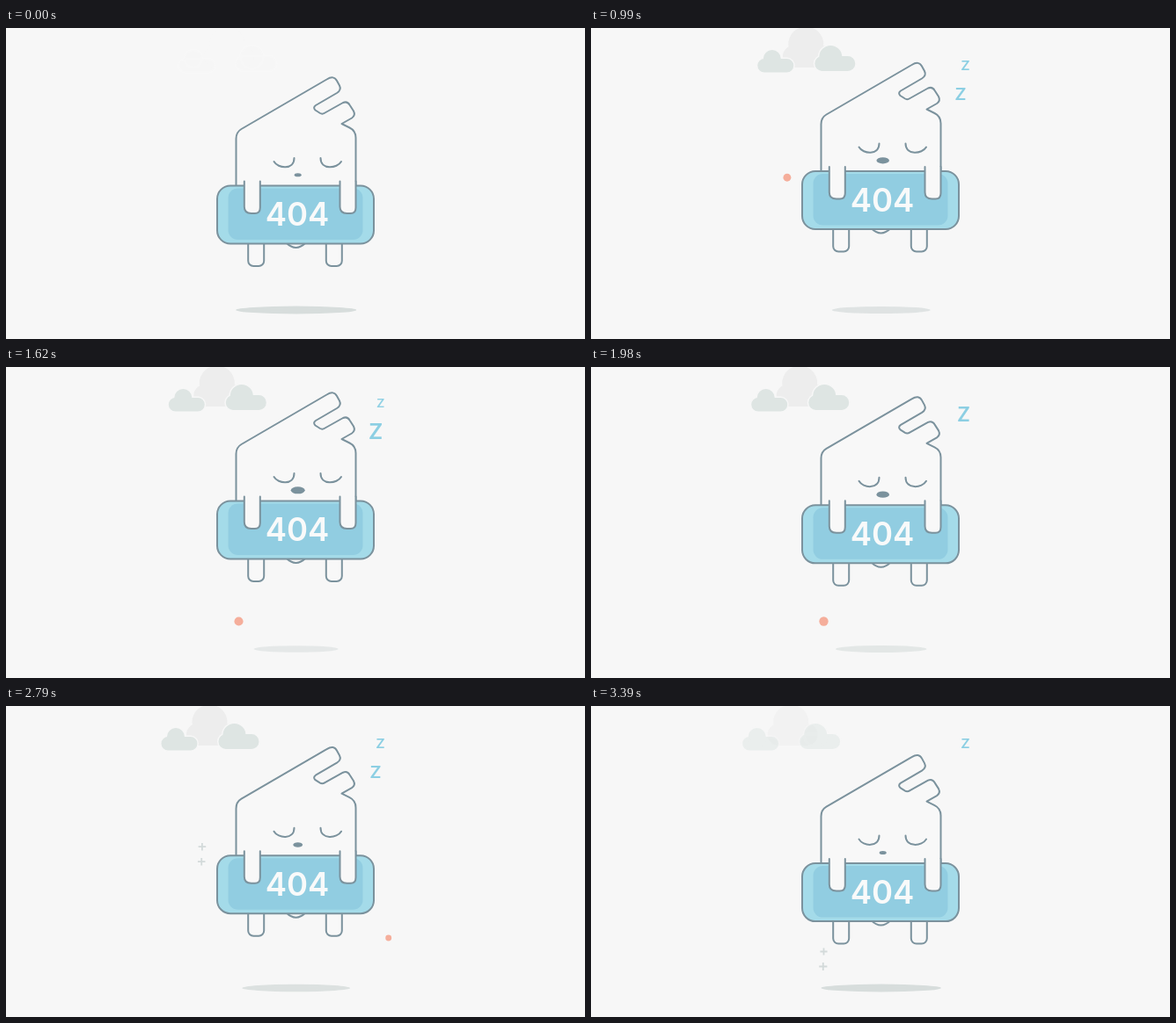
Recreate the animation shown at these times as an HTML page with a canvas. Size 658x354 px, loop 3.42 s.

```html
<!DOCTYPE html>
<html lang="en">
<head>
<meta charset="utf-8">
<title>404</title>
<style>
html, body { margin: 0; width: 100%; height: 100%; overflow: hidden; background: #f7f7f7; }
canvas { display: block; }
</style>
</head>
<body>
<canvas id="stage" width="658" height="354"></canvas>
<script>
const ctx = document.getElementById('stage').getContext('2d');
const LOOP = 3420, STEP = 30, PEAK = 1650, LIFT = 27.5;
const BG = '#f7f7f7', SKIN = '#f8f8f8', LINE = '#7b929d', BLUE = '#8ccfe3';

const clamp = v => Math.max(0, Math.min(1, v));

// Pops up quickly, holds, then shrinks away while u runs from 0 to 1.
const pulse = (u, pop, hold) => u > 0 && u < 1 ? Math.min(1, u * pop) * (1 - u ** hold) : 0;

function ellipse(x, y, rx, ry, fill) {
  ctx.beginPath();
  ctx.ellipse(x, y, rx, ry, 0, 0, 7);
  ctx.fillStyle = fill;
  ctx.fill();
}

function shape(path, fill, stroke, x = 0) {
  ctx.save();
  ctx.translate(x, 0);
  if (fill) { ctx.fillStyle = fill; ctx.fill(path); }
  if (stroke) { ctx.strokeStyle = stroke; ctx.stroke(path); }
  ctx.restore();
}

function box(x, y, w, h, r) {
  const p = new Path2D();
  p.roundRect(x, y, w, h, r);
  return p;
}

// A rounded base with one bump.
function cloud(x, y, w, h, bumpX, bumpY, r) {
  const p = box(x, y, w, h, h / 2);
  p.moveTo(bumpX + r, bumpY);
  p.arc(bumpX, bumpY, r, 0, 7);
  return p;
}

const bigCloud = cloud(221, 20, 57, 25, 247.5, 18.5, 20);
const leftCloud = cloud(192.5, 35, 41, 15.5, 209, 35, 10);
const rightCloud = cloud(257.5, 32, 46, 17, 275.5, 33, 13);

const body = new Path2D(`M261.5 200V126Q261.5 118.500 267.5 115L364.5 58.500Q372.5 53.500 376 60
  L379 65.500Q381.5 70.500 376 74L352 88Q348.5 90.500 351.5 93.500L357 97Q359.5 98.500 362.5 96.500
  L383 85Q388 83 390.5 87.500L395 94.500Q397.5 99.500 393 102.500L381.5 109
  L390.5 113.500Q397.5 117 397.5 125V200`);
const leg = box(-9, 236, 18, 35, [0, 0, 6, 6]);
const arm = new Path2D('M-9 174.500V203.500Q-9 211 -1 211H3Q9 211 9 204.500V174.500');
const belly = new Path2D('M318.500 244.500Q329.500 255.500 340.500 244.500');
const eyes = new Path2D('M304.500 152C309 160 327.500 162 327.500 148M357.500 148C357.500 162 376.500 160 381 152');
const board = box(240, 179.5, 178, 66, 15);
const panel = box(252.5, 182.5, 153, 58.5, 11);

function drawClouds(t) {
  ctx.save();
  ctx.translate(3.85 - t * .00713, 0);
  ctx.globalAlpha = Math.min(clamp(.08 + t / 290), clamp(.25 + (LOOP - t) / 120));
  ctx.lineWidth = 3;
  shape(bigCloud, '#ededed');
  for (const c of [leftCloud, rightCloud]) {
    shape(c, null, BG);
    shape(c, '#dee5e3');
  }
  ctx.restore();
}

function drawCharacter(t) {
  const rising = t < PEAK;
  const phase = rising ? t / PEAK : (LOOP - t) / (LOOP - PEAK);
  const lift = LIFT * (rising ? phase : phase ** 1.05);
  const nose = 4 + 4 * (rising ? Math.sin(phase * Math.PI / 2) : phase);

  ctx.globalAlpha = 1 - lift * .017;
  ellipse(329.7, 321, 68.5 - lift * .757, 4.4 - lift * .02, '#d7dddc');
  ctx.globalAlpha = 1;

  ctx.save();
  ctx.translate(0, -lift);
  ctx.lineWidth = 2;
  ctx.lineJoin = ctx.lineCap = 'round';
  for (const x of [284.2, 372.8]) shape(leg, SKIN, LINE, x);
  shape(belly, SKIN, LINE);
  shape(body, SKIN, LINE);
  shape(eyes, null, LINE);
  ellipse(331.7, 167.3, nose, nose / 2, LINE);

  shape(board, '#a4dbe9', LINE);
  shape(panel, '#91cde1');
  for (const x of [279.8, 388.5]) shape(arm, SKIN, LINE, x);
  ctx.fillStyle = '#f9fafa';
  ctx.font = '600 36.5px Inter, sans-serif';
  ctx.fillText('404', 331, 225);
  ctx.restore();
}

function drawSnores(t) {
  ctx.fillStyle = BLUE;
  for (let i = 0; i < 5; i++) {
    const age = t - 300 - i * 600, u = age / 890;
    const size = 24.6 * pulse(u, 8, 4);
    if (!size) continue;
    ctx.globalAlpha = clamp((1 - u) * 5);
    ctx.font = `700 ${size}px Lato, sans-serif`;
    ctx.fillText('Z', 419.2 + age * .0092, 79.3 - age * .0533 + size * .36);
  }
  ctx.globalAlpha = 1;
}

function drawPlus(x, y, age) {
  const r = 4.6 * pulse(age / 430, 4, 5);
  ctx.beginPath();
  ctx.moveTo(x - r, y);
  ctx.lineTo(x + r, y);
  ctx.moveTo(x, y - r);
  ctx.lineTo(x, y + r);
  ctx.stroke();
}

const sparks = [
  { x: 434.7, y: 143.6, dot: 300, life: 630, plus: 2180 },
  { x: 222.9, y: 170.2, dot: 945, life: 630, plus: 2540 },
  { x: 264.5, y: 289.5, dot: 1555, life: 800, plus: 3110 },
  { x: 434.7, y: 264, dot: 2755, life: 630, plus: 100 }
];

function drawSparks(t) {
  ctx.strokeStyle = '#d3dada';
  ctx.lineWidth = 1.8;
  for (const { x, y, dot, life, plus } of sparks) {
    const r = 5.2 * pulse((t - dot) / life, 12, 9);
    ellipse(x, y, r, r, '#f5ae9b');
    drawPlus(x, y - 10, t - plus);
    drawPlus(x - .7, y + 7, t - plus - 150);
  }
}

function frame() {
  const t = Math.floor(performance.now() % LOOP / STEP) * STEP;
  ctx.fillStyle = BG;
  ctx.fillRect(0, 0, 658, 354);
  ctx.textAlign = 'center';
  drawClouds(t);
  drawCharacter(t);
  drawSnores(t);
  drawSparks(t);
  requestAnimationFrame(frame);
}
frame();
</script>
</body>
</html>
```
